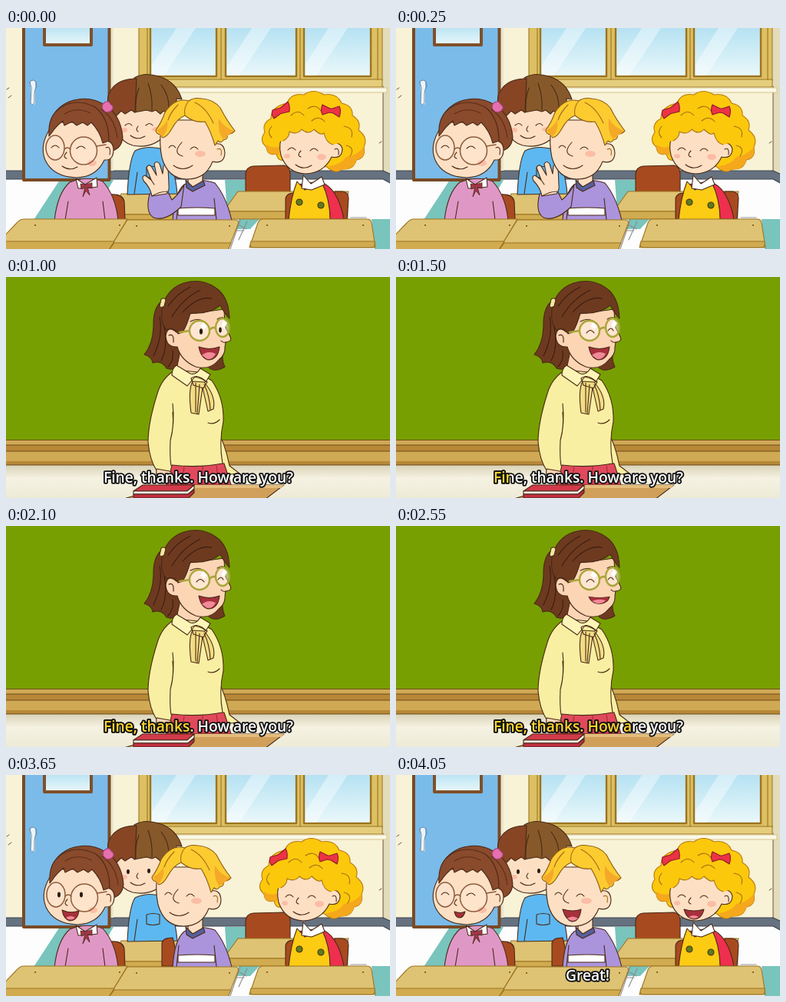
Recreate the animation shown at these times as an HTML page. Size 500x288 px, loop 4100 ms.

```html
<!DOCTYPE html>
<html lang="en">
<head>
<meta charset="utf-8">
<title>Classroom greeting</title>
<style>
html, body { margin: 0; width: 100%; height: 100%; overflow: hidden; }
svg { display: block; width: 100vw; height: 100vh; }
.ink { stroke: #4a2a17; stroke-width: 1.1; stroke-linejoin: round; stroke-linecap: round; }
.gold { stroke: #9c7420; }
.line { fill: none; }
.skin { fill: #fde0c4; }
.mouth { fill: #a8303c; }
.tongue { fill: #f08a98; stroke: none; }
.blush { fill: #f9a08e; opacity: .55; stroke: none; }
.dot { fill: #2b1a12; stroke: none; }
.wood { fill: #dfc374; }
.edge { fill: #d0ab50; }
.chair { fill: #a84a1f; }
text { font: 600 19.2px "Open Sans", "Noto Sans", sans-serif; text-anchor: middle; fill: #fff;
  stroke: #111; stroke-width: 3.6px; stroke-linejoin: round; paint-order: stroke; }
#sung text { fill: #ffd52e; }
</style>
</head>
<body>
<svg viewBox="0 0 500 288" preserveAspectRatio="none">
<defs>
  <linearGradient id="glass" x2="0" y2="1"><stop stop-color="#b4e1f2"/><stop offset="1" stop-color="#eaf8fa"/></linearGradient>
  <linearGradient id="plinth" x2="0" y2="1"><stop stop-color="#d9d2b6"/><stop offset=".4" stop-color="#f6f2e2"/><stop offset="1" stop-color="#eeead8"/></linearGradient>
  <clipPath id="wipe"><rect id="bar" y="240" height="48"/></clipPath>
</defs>

<g id="kids" class="ink">
  <g stroke="none">
    <path fill="#f8f2d6" d="M0 0H500V186H0Z"/>
    <path fill="#e3dcba" d="M491 0H500V190H491Z"/>
    <path fill="#fcfdfc" d="M0 198H500V288H0Z"/>
    <path fill="#79c4bd" d="M70 198H140L110 250H36ZM285 198H313V213L288 240ZM476 249H500V288H480ZM303 249H330L318 262H300Z"/>
  </g>
  <path fill="#667280" stroke="#3a434e" d="M-2 186H491L502 191V203L491 197H-2Z"/>
  <path class="line" stroke-width=".8" d="M7 88l-4 3m1-13l-3 2M491 76V186M486 150l3-2"/>

  <path fill="#e9e6cf" stroke="none" d="M131 0H140V186H131Z"/>
  <path fill="#7abbe9" stroke="#7a4a24" stroke-width="4" d="M23 -4H134.500V198H23Z"/>
  <path fill="url(#glass)" stroke="#80502a" stroke-width="4" d="M50 -4H111V22H50Z"/>
  <path class="line" stroke="#eef3f5" stroke-width="6" d="M35 71V97"/>
  <path class="line" stroke="#5f7f98" stroke-width=".9" d="M31 70q4-4 8 0l1 6q-3 4-3 10v11q-2 5-5 1l1-20z"/>

  <g class="gold">
    <path fill="#dcc063" d="M173 -2H490V68H173Z"/>
    <path fill="#e5cd7c" d="M173 67H490V77H173Z"/>
    <path class="line" d="M184 0V67M280 0V67M383 0V67M484 0V67"/>
    <g fill="url(#glass)" stroke-width="2.400"><path d="M188 -2H274V63H188ZM286 -2H378V63H286ZM388 -2H475V63H388Z"/></g>
    <path stroke="#d8c88e" fill="#fbf8e6" d="M222 78H496V84H222Z"/>
  </g>
  <path fill="#fff" stroke="none" opacity=".4" d="M222 0H247L206 62H190V48ZM320 0H345L304 62H288V50ZM420 0H445L404 62H390V47Z"/>

  <!-- back row -->
  <path class="chair" d="M312 214V190Q313 181 322 180L362 179Q370 181 370 190V214Z"/>
  <g class="gold">
    <path class="wood" d="M302 213H446L440 239H289Q284 237 289 231Z"/>
    <path class="edge" d="M286 239H440V249H288Z"/>
    <path class="wood" d="M150 216H236L226 243H140Z"/>
    <path class="edge" d="M140 243H226V250H140Z"/>
  </g>
  <path class="line" stroke="#999" d="M445 215V249M449 247h20"/>

  <g id="backBoy">
    <path fill="#5db8f1" d="M158 217Q160 172 168 160Q184 152 205 158Q220 180 223 216Z"/>
    <path class="line" d="M167 216l4-28M183 182q9-3 17 0v12q-9 3-17 0z"/>
    <path class="skin" d="M142 108Q141 147 165 153Q190 158 207 140L212 105Z"/>
    <path fill="#87592a" d="M167 65Q180 57 199 63Q222 70 229 93L222 92Q224 104 214 113L205 108L201 112L195 107L190 109L183 107L167 110Z"/>
    <path fill="#874524" d="M168 110L163 107L155 112L150 108L141 117Q127 95 136 82Q145 66 170 66Z"/>
    <path class="line" d="M173 78Q168 92 169 108M185 72Q191 88 190 107M202 74Q213 88 212 106"/>
    <path class="line" d="M172 128q-4 5 0 7M162 140q9 7 19 1"/>
    <ellipse class="blush" cx="196" cy="132" rx="6" ry="3"/><ellipse class="blush" cx="154" cy="133" rx="4" ry="3"/>
    <path id="backShut" class="line" d="M155 127q5-5 9 0M182 127q5-5 9 0"/>
    <path id="backOpen" class="dot" d="M157 126a2 3 0 1 0 4 0a2 3 0 1 0-4 0M184 125a2 3 0 1 0 4 0a2 3 0 1 0-4 0"/>
  </g>

  <!-- girl with glasses -->
  <path class="chair" d="M136 250V217Q152 216 154 226L155 250Z"/>
  <path fill="#df98c6" d="M63 251Q67 215 83 201Q105 192 126 200Q143 219 146 251Z"/>
  <path class="line" d="M77 250l4-24M129 250l-3-24"/>
  <path fill="#fff" d="M91 196L103 204L118 195L119 207L104 209L94 209Z"/>
  <path fill="#a8344a" stroke-width=".8" d="M103 204l-6-1 1 7 5-3-3 13 4-8 5 6-3-11 6 2v-7z"/>
  <g id="glassesGirl">
    <path fill="#8a4a2c" d="M57 140Q55 108 82 96Q108 87 128 100Q149 112 152 142Q151 156 139 160L130 170Z"/>
    <path class="skin" d="M58 130Q43 153 51 172Q61 194 92 195Q118 194 128 172Q140 173 140 158Q139 146 127 147L118 123L64 123Z"/>
    <path fill="#8a4a2c" d="M56 141Q54 114 72 103Q92 91 116 103Q134 117 134 147L126 150Q122 134 111 123L106 127L100 123L92 127L86 122L76 127L74 121Q64 129 60 136Z"/>
    <path class="line" stroke="#5d2d18" d="M76 112Q92 102 110 111M124 106Q142 118 145 143M130 156q7-3 5 9"/>
    <path fill="#e470ae" stroke="#a33f78" d="M127 98q6-5 9 1q6 4 1 9q-7 4-10-1q-4-5 0-9z"/>
    <ellipse class="blush" cx="112" cy="176" rx="6" ry="4"/>
    <path class="line" d="M79 162q-6 6 0 8"/>
    <g stroke="#8e5b3d" stroke-width="1.500">
      <ellipse cx="64" cy="156" rx="12" ry="16" fill="#fff" fill-opacity=".12"/>
      <ellipse cx="101" cy="160" rx="17.500" ry="18" fill="#fff" fill-opacity=".12"/>
      <path class="line" d="M76 158q4-4 8 0M118 154l12-2"/>
    </g>
    <path id="girlShut" class="line" d="M59 156q5-6 10 0M92 157q6-6 11 0"/>
    <path id="girlOpen" class="dot" d="M66 156a2 3.4 0 1 0 4 0a2 3.4 0 1 0-4 0M95 156a2 3.4 0 1 0 4 0a2 3.4 0 1 0-4 0"/>
    <path id="girlSmile" class="line" d="M73 180q10 7 20 1"/>
    <g id="girlTalk"><path class="mouth" d="M72 176Q83 181 94 177Q92 190 82 190Q74 188 72 176Z"/><path class="tongue" d="M77 186q6-4 12 0q-6 5-12 0z"/></g>
    <path id="girlSay" class="mouth" d="M76 178q8 3 14 0q-2 8-8 8q-5-1-6-8z"/>
  </g>

  <!-- blond boy -->
  <path id="boyChair" class="chair" d="M203 249V219Q204 212 217 212L226 249Z"/>
  <path fill="#ab94dc" d="M217 251Q219 215 232 204Q250 194 272 202Q287 220 294 251Z"/>
  <path fill="#fff" d="M224 235Q250 233 272 235V244H224Z"/>
  <path class="line" d="M222 250l3-28M274 250l-3-28"/>
  <path class="skin" d="M237 190V202L244 208L256 200V188Z"/>
  <path fill="#56609c" d="M234 198L243 207L257 199L259 205L243 213L235 208Z"/>
  <g id="wave">
    <path fill="#ab94dc" d="M232 204Q226 216 216 224L209 210L187 216Q181 240 192 247Q207 253 228 233Z"/>
    <path class="skin" d="M190 219Q188 208 179 199Q176 193 181 192L189 198L183 182Q185 177 189 180L196 192L193 177Q196 172 200 177L204 190L205 180Q209 175 211 181L212 204Q213 212 209 216Z"/>
    <path class="line" d="M189 198l4 6M190 219q10-6 20-6"/>
  </g>
  <g id="boy">
    <path class="skin" d="M202 133Q199 150 203 169Q211 197 236 197Q260 197 269 174Q284 178 285 163Q284 149 273 151L266 120H216Z"/>
    <path fill="#fccb30" stroke="#8a5a14" d="M238 95Q244 90 255 92Q270 93 279 104Q287 120 298 134Q293 139 288 138Q290 145 283 146Q280 151 276 147L272 153Q267 135 259 122Q245 124 233 114Q223 118 216 131Q210 142 204 143L201 139Q195 138 195 133Q202 124 207 110Q220 90 238 95Z"/>
    <path fill="#f5a928" stroke="none" d="M196 133Q204 130 210 120Q212 134 203 142ZM297 134Q284 130 277 118Q275 136 283 145Z"/>
    <path class="line" stroke="#a56c14" d="M238 95Q231 103 233 114M246 97Q261 104 270 124M224 100Q214 110 211 120M275 158q7-3 5 8"/>
    <path class="line" d="M229 149Q216 163 230 167"/>
    <ellipse class="blush" cx="253" cy="164" rx="7" ry="4"/>
    <path class="line" d="M212 156q4-6 9 0M240 158q5-6 10 0"/>
    <path id="boySmile" class="line" d="M218 179q12 9 25 0"/>
    <g id="boyTalk"><path class="mouth" d="M222 175Q236 179 246 175Q244 191 234 191Q226 189 222 175Z"/><path class="tongue" d="M228 187q7-5 14 0q-7 6-14 0z"/></g>
  </g>

  <!-- curly girl -->
  <path class="chair" d="M364 249V222Q366 215 374 215L378 249ZM428 249V213H438Q446 214 446 222L444 249Z"/>
  <path fill="#ee2f4e" d="M374 249Q370 220 380 204L408 200Q432 207 440 249Z"/>
  <path fill="#fccc14" d="M368 250Q371 220 379 200L389 211L411 201Q422 223 422 250Z"/>
  <path fill="#fff" d="M387 192L397 203L411 194L415 204L398 211L385 209Z"/>
  <g fill="#5b7d1c"><circle cx="382" cy="227" r="4"/><circle cx="410" cy="231" r="4"/></g>
  <g id="curly">
    <path fill="#fcc80c" stroke="#b97a10" d="M366 98Q371 84 388 87Q400 78 414 87Q431 84 437 98Q452 101 451 114Q463 121 459 133Q472 143 466 155Q469 169 456 172Q453 185 438 184Q428 191 418 181L362 172Q354 174 352 164Q340 167 339 155Q329 147 337 136Q333 124 345 118Q345 102 366 98Z"/>
    <path fill="#f5a81c" stroke="none" d="M466 155Q469 169 456 172Q453 185 438 184Q428 191 420 180Q437 178 443 168Q457 166 466 155ZM339 152Q348 158 356 154V166L352 164Q340 167 339 155Z"/>
    <path class="skin" d="M361 139Q354 150 358 166Q366 189 390 190Q414 189 424 168Q437 171 438 158Q436 148 425 151L418 122H370Z"/>
    <path fill="#fcc80c" stroke="none" d="M355 148L355 118L400 104L436 118L438 149L426 152Q417 150 414 137Q410 141 401 132Q394 140 385 132Q379 140 369 135Q368 143 361 147Z"/>
    <path class="line" stroke="#a5700f" d="M361 147Q369 143 369 135Q379 140 385 132Q394 140 401 132Q410 141 414 137Q417 150 426 152M371 114q9-9 17 0M393 105q10-7 17 3M398 121q9-8 17 1M440 128q13 2 10 14M443 153q12 3 5 14M346 128q-7 8 0 15"/>
    <path class="line" d="M428 158q6-3 5 7"/>
    <g fill="#ec3345" stroke="#8a1c2a">
      <path d="M357 104l-10 3q-2 6 2 11l8-6 3-1 9-2q1-8-2-13l-7 6z"/>
      <path d="M422 105l-10-5q-3 7 0 13l9-3 5 1 8 5q3-8 0-14l-9 3z"/>
    </g>
    <ellipse class="blush" cx="411" cy="168" rx="6" ry="4"/><ellipse class="blush" cx="366" cy="167" rx="4" ry="3"/>
    <path class="line" d="M367 159q5-6 10 0M396 160q5-6 10 0M384 160q-6 6 0 8"/>
    <path id="curlySmile" class="line" d="M377 178q10 8 21 1"/>
    <g id="curlyTalk"><path class="mouth" d="M375 175Q388 179 401 175Q398 188 388 188Q378 187 375 175Z"/><path class="tongue" d="M381 185q7-4 13 0q-6 4-13 0z"/></g>
  </g>

  <!-- front desks -->
  <path class="line" stroke="#8b8b90" d="M305 250L292 288M314 252L303 276M301 264h9M304 257l9 5"/>
  <g class="gold">
    <path class="wood" d="M24 249H158L132 292H-22L14 254Q18 249 24 249ZM158 250H298Q304 250 302 256L288 292H132ZM335 249H470Q475 249 476 254L481 286H317L328 254Q330 249 335 249Z"/>
    <path class="edge" d="M-14 278H141L132 292H-20ZM141 280H293L288 292H132ZM319 278H480Q481 286 477 286H322Q316 286 319 278Z"/>
  </g>
  <path fill="#8a6420" stroke="none" d="M37 256h2v2h-2zM147 256h2v2h-2zM169 257h2v2h-2zM290 257h2v2h-2zM339 256h2v2h-2zM464 256h2v2h-2z"/>
</g>

<g id="teacher" class="ink">
  <g stroke="none">
    <path fill="#779f02" d="M0 0H500V213H0Z"/>
    <path fill="#d0a955" d="M0 213H500V245H0Z"/>
    <path fill="#b78837" d="M0 219H500V227H0ZM0 240H500V245H0Z"/>
    <path fill="url(#plinth)" d="M0 245H500V288H0Z"/>
  </g>
  <path class="line" d="M0 212.5H500M0 219H500M0 227H500M0 245H500" stroke="#6e4d1c"/>

  <path fill="#f9efa2" d="M272 194Q285 215 291 246L304 256L280 258Z"/>
  <path fill="#e14a5c" d="M214 243H284L294 274H208Z"/>
  <path class="line" d="M232 248l-4 24M256 247v25M274 246l4 26" stroke="#a32a3c"/>
  <path fill="#6d3a20" d="M205 30Q191 38 192 65Q191 88 180 101Q190 104 191 112Q203 108 209 119Q220 123 227 112L262 116Q270 126 285 117Q280 108 283 94L246 40Z"/>
  <path fill="#fcd5b5" d="M228 92L222 120L247 133L256 113Z"/>
  <path fill="#f9efa2" d="M221 121Q203 131 197 152Q185 190 185 215Q187 238 196 252L214 254L216 245Q250 249 282 243Q277 216 283 188Q284 158 268 135L250 124Z"/>
  <path class="line" d="M217 165Q220 190 214 213Q213 234 215 246M263 190q8 3 15-4M217 176q2 20-3 37"/>
  <path fill="#fcd5b5" d="M196 250Q194 262 203 266L217 264Q219 256 213 253Z"/>
  <path fill="#fdf5b8" d="M222 115Q216 119 216 128L236 142L246 130Q257 132 260 137L266 127L253 119Q248 128 240 126Z"/>
  <path fill="#f1dc83" d="M243 136Q237 147 241 177L251 179L256 144L263 175L270 172Q274 156 258 137Z"/>
  <path class="line" d="M247 138v38M252 140l-3 38M258 140q7 14 8 33M241 132q7-5 14 0l7 5-5 8-13-4z"/>

  <path fill="#fcd5b5" d="M224 50Q224 68 222 72Q210 62 208 77Q209 92 223 91Q228 109 247 117Q266 122 277 108Q286 101 285 91L286 85Q295 84 292 78L285 64L284 42Z"/>
  <path fill="#6d3a20" d="M203 42Q208 16 231 8Q255 1 273 14Q290 25 291 54Q284 47 279 37Q264 49 240 47Q236 62 230 72L224 74Q218 64 209 69Q201 61 203 42Z"/>
  <path class="line" stroke="#3d1d10" d="M211 38Q223 21 240 13M216 52Q230 28 253 17M230 46Q250 24 268 28M200 52Q205 76 192 103M206 65Q211 92 202 109M217 96Q219 109 211 117M212 76q7-3 6 9"/>
  <path fill="#f3e7a0" d="M202 29q4-3 6 1l-2 8q-4 3-6 0z"/>
  <path class="line" d="M240 58q9-5 16-1M275 55q6-4 10-1M286 85q-4 1-6-2"/>
  <g stroke="#a9a53a" stroke-width="2.4">
    <circle cx="252" cy="70" r="13" fill="#fff" fill-opacity=".4"/>
    <ellipse cx="282" cy="66" rx="9" ry="12" fill="#fff" fill-opacity=".4"/>
    <path class="line" d="M265 69q4-5 8-2M239 70l-13 2"/>
  </g>
  <path stroke="none" fill="#fff" d="M257 59l5 5-4 5-5-5zM284 56l4 4-4 7-4-4z"/>
  <g id="eyesOpen"><ellipse class="dot" cx="254" cy="71" rx="2.1" ry="3.8"/><ellipse class="dot" cx="279" cy="69" rx="1.8" ry="3.5"/></g>
  <path id="eyesShut" class="line" d="M248 73q5-7 10 0M276 70q4-6 7 0"/>
  <g id="talk"><path class="mouth" d="M251 91Q265 96 278 91Q276 108 263 108Q254 106 251 91Z"/><path class="tongue" d="M255 102Q263 95 273 100Q269 108 262 107Z"/></g>
  <path id="closedSmile" class="line" d="M252 99q11 6 21 0"/>

  <path fill="#d0a05a" d="M216 271H362L337 290H150Z"/>
  <path fill="#e4bd7c" d="M216 271H362L358 275H210Z" stroke="none"/>
  <path fill="#d33a4a" d="M178 271H245L236 279H166Z"/>
  <path fill="#f3f0ea" d="M166 279H236L245 271V276L237 283H166Z"/>
  <path fill="#c02f40" d="M166 283H237L245 277V281L238 288H166Z"/>
  <text x="250.5" y="268">Fine, thanks. How are you?</text>
  <g id="sung" clip-path="url(#wipe)"><text x="250.5" y="268">Fine, thanks. How are you?</text></g>
</g>

<text id="great" x="249.5" y="268">Great!</text>
</svg>
<script>
const LOOP = 4100, TO_TEACHER = 700, TO_KIDS = 3450, CHEER = 3800;
const el = id => document.getElementById(id);
const show = (on, ...ids) => ids.forEach(id => el(id).style.display = on ? '' : 'none');
const shift = (id, x) => el(id).setAttribute('transform', `translate(${x} 0)`);
const ramp = (t, a, b) => Math.min(1, Math.max(0, (t - a) / (b - a)));

function draw(t) {
  const teaching = t >= TO_TEACHER && t < TO_KIDS;
  const after = t >= TO_KIDS, cheer = t >= CHEER, chat = after && !cheer;
  show(teaching, 'teacher');
  show(!teaching, 'kids');
  show(cheer, 'great');

  // Kids: greeting pose first, reply after the lesson line
  show(!after, 'wave', 'backShut', 'girlSmile');
  show(after, 'boyChair', 'backOpen');
  show(chat, 'girlOpen', 'girlTalk');
  show(!chat, 'girlShut');
  show(cheer, 'girlSay', 'boyTalk', 'curlyTalk');
  show(!cheer, 'boySmile', 'curlySmile');
  shift('boy', after ? -5 : 0);
  shift('curly', chat ? -3 : 0);
  shift('glassesGirl', chat ? 1 : 0);

  // Teacher: speaking mouth, smiling eyes and the sung-along line
  const speaking = t < 2950, wide = Math.floor(t / 150) % 2 === 0;
  show(speaking, 'talk');
  show(!speaking, 'closedSmile');
  el('talk').setAttribute('transform', wide ? '' : 'translate(0 41) scale(1 .56)');
  show(t < 1450, 'eyesOpen');
  show(t >= 1450, 'eyesShut');
  el('bar').setAttribute('width', 122 + 120 * ramp(t, 1350, 2050) + 140 * ramp(t, 2200, 2950));
}

function tick() {
  draw(performance.now() % LOOP);
  requestAnimationFrame(tick);
}
tick();
</script>
</body>
</html>
```
